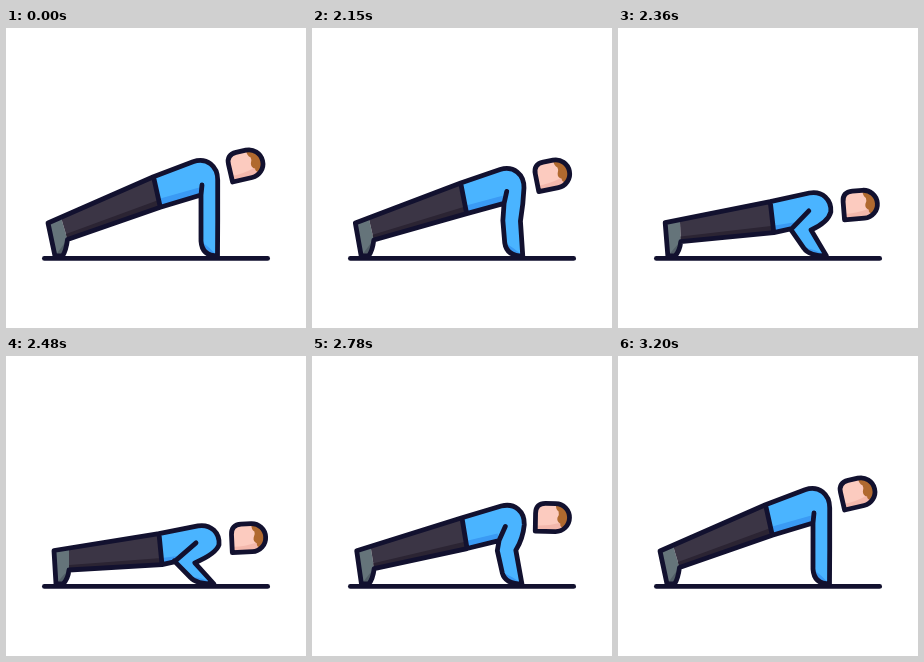
These frames come from a looping animation (300x300 px, 3.26 s). An HTML page:

```html
<!DOCTYPE html>
<html lang="en">
<head>
<meta charset="utf-8">
<title>Push-up</title>
<style>
  html, body { margin: 0; width: 100%; height: 100%; overflow: hidden; background: #fff; }
  svg { display: block; width: 100vw; height: 100vh; }
  .line { fill: none; stroke: #12112f; stroke-width: 4.8; stroke-linecap: round; stroke-linejoin: round; }
</style>
</head>
<body>
<svg viewBox="0 0 300 300">
  <path class="line" d="M38.4 230.4H261.6"/>
  <g id="body"></g>
  <g id="head">
    <path fill="#fccbbf" d="M-17 14V-4Q-17 -14 -7 -14H3A14 14 0 0 1 3 14Z"/>
    <path fill="#f3b8ac" d="M-17 14V8Q-6 9 8 5L12 11L3 14Z"/>
    <path fill="#b0692f" d="M3 -14A14 14 0 0 1 12 11Q7 9 8 6Q4 4 5 0Q7 -3 6 -6Q3 -8 3 -14Z"/>
    <path class="line" d="M-17 14V-4Q-17 -14 -7 -14H3A14 14 0 0 1 3 14Z"/>
  </g>
</svg>
<script>
const LOOP = 3260, START = 2030, STEP = 30;

// time, bend, head x, head y, head angle
const KEYS = [
  [2000, 0, 240, 136.5, -13],
  [2120, .14, 240.5, 143, -12],
  [2270, .66, 242, 167, -6],
  [2400, .92, 242.5, 179, -4],
  [2520, 1.01, 242.7, 182.3, -2],
  [2650, .84, 242, 177, 0],
  [2780, .45, 240.5, 161.5, 1],
  [2900, .04, 239, 133.5, -19],
  [2990, -.04, 239, 130, -22],
  [3090, -.03, 239.5, 133.5, -17],
  [3200, 0, 240, 136.5, -13]
];

// joints: x, y with arms straight, then x, y with arms bent
const JOINTS = {
  heel: [42, 195, 48, 194.5],
  sole: [49, 228, 50, 228],
  toe: [56.5, 228, 57, 228],
  toeBend: [60, 223, 62, 223],
  ankle: [61.5, 211.5, 63, 214],
  ankleTop: [55, 189.5, 63, 192],
  shoeMid: [57, 217, 58, 218],
  calfMid: [60, 206, 63, 209],
  hip: [147.5, 148.7, 153, 177.7],
  hipMid: [152.5, 172, 155.5, 202],
  hipLow: [154.3, 179.3, 156, 208.7],
  shirtLow: [152.5, 171, 155.5, 202],
  back: [187, 133.7, 192, 170],
  backOut: [201, 129, 205, 168],
  shoulderIn: [211.7, 138, 214, 177],
  shoulder: [211.7, 152, 213, 189],
  armBend: [211.7, 170, 210, 198],
  handR: [211.5, 228, 208, 228],
  palm: [196, 228, 190, 228],
  wrist: [195, 213, 184.5, 221.5],
  wristIn: [203, 219, 194, 220],
  pitIn: [195, 159, 174, 200],
  crease: [196, 157, 190, 187]
};

const TORSO = 'M hip L back C backOut shoulderIn shoulder Q armBend inner L handR Q palm wrist L elbow L armpit L hipLow Z';
const LAYERS = [
  ['M heel L ankleTop L ankle Q toeBend toe L sole Z', '#65747a'],
  ['M ankle Q toeBend toe L sole Q shoeMid ankle Z', '#525f67'],
  ['M ankleTop L hip L hipLow L ankle Z', '#3b3545'],
  ['M calfMid L hipMid L hipLow L ankle Z', '#2b2433'],
  [TORSO, '#4ab4ff'],
  ['M shirtLow L pitIn L armpit L hipLow Z', '#3a9af4'],
  ['M wrist Q wristIn handR Q palm wrist Z', '#3a9af4'],
  ['M hipLow L ankle Q toeBend toe L sole L heel L hip M armpit L crease ' + TORSO]
];

const body = document.getElementById('body');
const head = document.getElementById('head');
const paths = LAYERS.map(([, fill]) => {
  const path = document.createElementNS('http://www.w3.org/2000/svg', 'path');
  if (fill) path.setAttribute('fill', fill);
  else path.setAttribute('class', 'line');
  return body.appendChild(path);
});

// slope of a monotone curve at key i
function slope(i, c) {
  const a = KEYS[i - 1], b = KEYS[i], d = KEYS[i + 1];
  if (!a || !d) return 0;
  const m = (b[c] - a[c]) / (b[0] - a[0]);
  const n = (d[c] - b[c]) / (d[0] - b[0]);
  return m * n > 0 ? 2 * m * n / (m + n) : 0;
}

function sample(t, c) {
  const last = KEYS.length - 1;
  if (t <= KEYS[0][0]) return KEYS[0][c];
  if (t >= KEYS[last][0]) return KEYS[last][c];
  const i = KEYS.findIndex(k => k[0] > t) - 1;
  const a = KEYS[i], b = KEYS[i + 1], w = b[0] - a[0], u = (t - a[0]) / w;
  const v = 1 - u;
  return v * v * (1 + 2 * u) * a[c] + u * u * (3 - 2 * u) * b[c]
    + w * u * v * (v * slope(i, c) - u * slope(i + 1, c));
}

// the arm folds along curves, everything else moves straight
const ARM = {
  elbow: q => [195 - 17 * q - 10 * q * q, 192 + 13 * q * q],
  inner: q => [211.7 - 13 * q - 10 * q * q, 193 + 14 * q ** 3],
  armpit: q => [195 - 10 * q - 17 * q * q, 167 + 39 * q]
};

function joint(name, p) {
  if (ARM[name]) return ARM[name](Math.max(p, 0));
  const [x0, y0, x1, y1] = JOINTS[name];
  return [x0 + (x1 - x0) * p, y0 + (y1 - y0) * p];
}

function draw(time) {
  const t = time < START ? 0 : START + Math.floor((time - START) / STEP) * STEP;
  const [p, x, y, angle] = [1, 2, 3, 4].map(c => sample(t, c));
  LAYERS.forEach(([shape], i) => {
    const d = shape.replace(/[a-z]\w+/g, name => joint(name, p).map(n => n.toFixed(2)).join(' '));
    paths[i].setAttribute('d', d);
  });
  head.setAttribute('transform', `translate(${x} ${y}) rotate(${angle})`);
}

const begin = performance.now();
function tick() {
  draw((performance.now() - begin) % LOOP);
  requestAnimationFrame(tick);
}
tick();
</script>
</body>
</html>
```
